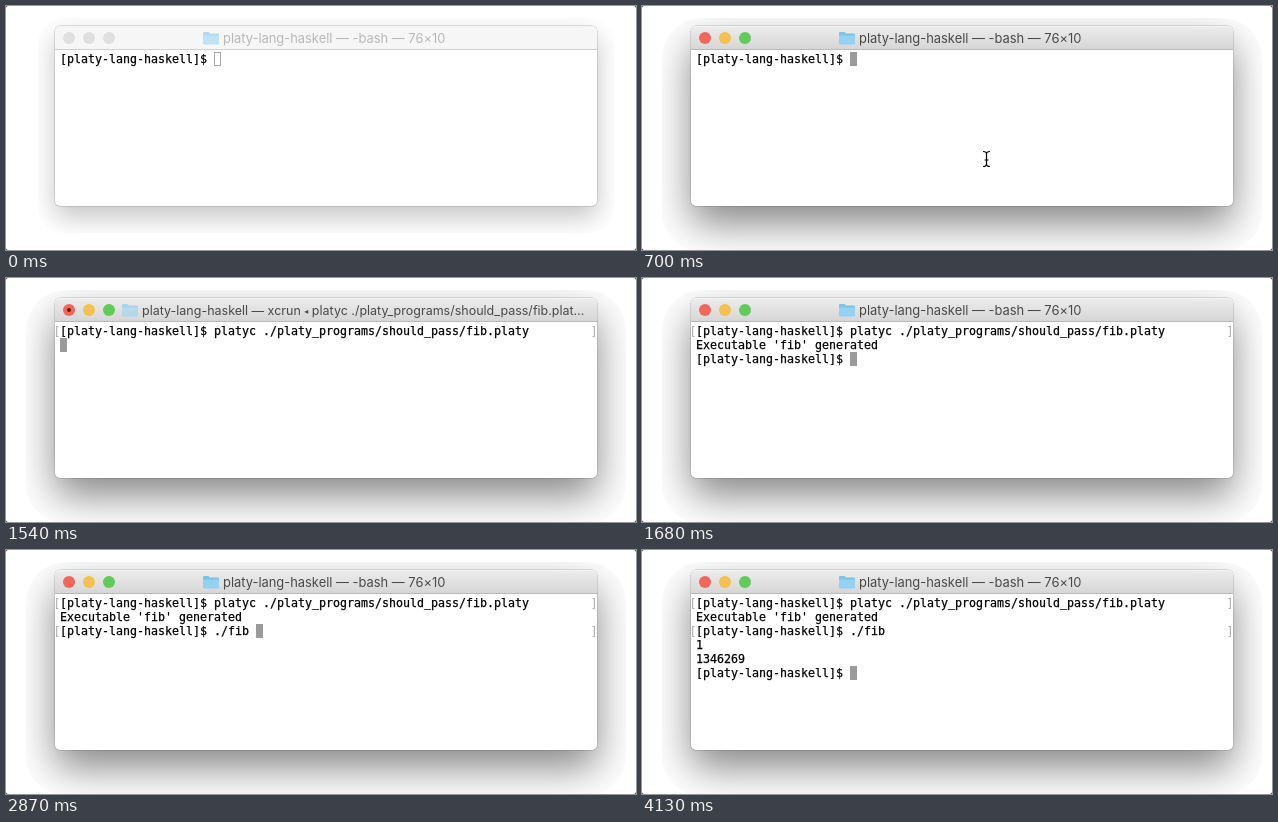
Write an HTML page that moves like this. It is 630 by 244 pixels and loops after 4.62 s.

```html
<!DOCTYPE html>
<html lang="en">
<head>
<meta charset="utf-8">
<title>Terminal session</title>
<style>
  html, body { margin: 0; width: 100%; height: 100%; overflow: hidden; background: #000; }
  #stage { position: relative; width: 630px; height: 244px; overflow: hidden; background: #fff; border-radius: 2px; }
  #stage * { position: absolute; box-sizing: border-box; }
  #win {
    left: 49px; top: 20px; width: 542px; height: 180px; border-radius: 5px; background: #fff;
    box-shadow: 0 0 0 .5px rgba(0,0,0,.22), 0 18px 40px rgba(0,0,0,.48);
    clip-path: inset(-8px -29px -46px -29px round 40px);
  }
  #bar {
    left: 0; top: 0; width: 542px; height: 24px; border-radius: 5px 5px 0 0;
    background: linear-gradient(#edeced, #d7d6d7); border-bottom: 1px solid #b9b8b9;
    border-top: 1px solid #f4f3f4;
  }
  .light { top: 26px; width: 12px; height: 12px; border-radius: 50%; }
  #dot { left: 61px; top: 30px; width: 4px; height: 4px; border-radius: 50%; background: #7a100c; }
  #title {
    top: 22.5px; white-space: pre; color: #4a4a4a;
    font: 12.9px/20px Inter, "DejaVu Sans", sans-serif; font-feature-settings: "calt" 0;
  }
  #title small { position: static; font-size: 8px; line-height: 1; vertical-align: 1px; }
  #folder { top: 25px; }
  #text, .mark { font: 11.63px/14px "DejaVu Sans Mono", monospace; white-space: pre; margin: 0; color: #000; }
  #text { left: 54px; top: 46px; -webkit-text-stroke: .25px #000; }
  .mark { color: #a9a9a9; }
  #caret { width: 7px; height: 14px; background: #9a9a9a; }
  #mouse { left: 0; top: 0; }

  .idle #win {
    box-shadow: 0 0 0 .5px rgba(0,0,0,.22), 0 11px 27px rgba(0,0,0,.24);
    clip-path: inset(-8px -17px -27px -17px round 26px);
  }
  .idle #bar { background: #f6f6f6; border-bottom-color: #d0d0d0; }
  .idle .light { background: #dfdfdf !important; }
  .idle #title { color: #b8b8b8; }
  .idle #folder, .busy #folder { opacity: .55; }
  .idle #caret { background: none; border: 1px solid #a8a8a8; }
</style>
</head>
<body>
<div id="stage">
  <div id="win"><div id="bar"></div></div>
  <div class="light" style="left:57px;background:#f2665c"></div>
  <div class="light" style="left:77px;background:#f6c050"></div>
  <div class="light" style="left:97px;background:#60cb5a"></div>
  <div id="dot"></div>
  <svg id="folder" width="16" height="14">
    <path d="M0 2.2Q0 1 1.2 1H5.4L7 2.6H14.8Q16 2.6 16 3.8V12.3Q16 13.3 15 13.3H1Q0 13.3 0 12.3Z" fill="#7cc3e8"/>
    <path d="M0 4.6H16V12.3Q16 13.3 15 13.3H1Q0 13.3 0 12.3Z" fill="#93d2f4"/>
  </svg>
  <div id="title"></div>
  <div id="caret"></div>
  <pre id="text"></pre>
  <div id="marks"></div>
  <svg id="mouse" width="630" height="244" fill="none">
    <g id="beam">
      <path id="beamHalo" stroke="#fff" stroke-width="3"/>
      <path id="beamLine" stroke="#000" stroke-width="1.2"/>
    </g>
    <path id="arrow" d="M0 0V14.2L3.3 11.1L5.5 16.2L7.9 15.2L5.7 10.2H10.2Z" fill="#000" stroke="#fff"/>
    <circle id="ring" cx="344" cy="153" r="16.3" stroke="#000" stroke-width="1.6"/>
  </svg>
</div>
<script>
const LOOP = 4620, CELL = 7, ROW = 14, LEFT = 54, TOP = 46;
const $ = id => document.getElementById(id);

const prompt = "[platy-lang-haskell]$ ";
const command = prompt + "platyc ./platy_programs/should_pass/fib.platy";
const built = command + "\nExecutable 'fib' generated\n" + prompt;
const ran = built + "./fib ";

const titles = {
  bash: { html: "platy-lang-haskell — -bash — 76×10", x: 217, size: 12.9 },
  xcrun: {
    html: "platy-lang-haskell — xcrun <small>◂</small> platyc ./platy_programs/should_pass/fib.plat…",
    x: 136, size: 12.5
  }
};

const start = { idle: true, title: "bash", dot: false, text: prompt, marks: [], mouse: null, ring: false };

// Each step changes only the listed properties.
const steps = [
  [280, { mouse: ["arrow", 325.5, 216] }],
  [350, { mouse: ["beam", 339, 186] }],
  [420, { mouse: ["beam", 349, 162] }],
  [560, { mouse: ["beam", 344.5, 153] }],
  [630, { ring: true }],
  [700, { ring: false, idle: false }],
  [1050, { text: command }],
  [1400, { text: command + "\n", marks: [0], mouse: null }],
  [1540, { title: "xcrun", dot: true }],
  [1610, { text: built }],
  [1680, { title: "bash", dot: false }],
  [2310, { text: built + "." }],
  [2380, { text: built + "./" }],
  [2590, { text: built + "./f" }],
  [2730, { text: built + "./fi" }],
  [2870, { text: ran, marks: [0, 2] }],
  [3150, { text: ran + "\n", dot: true }],
  [3220, { text: ran + "\n1\n1346269\n" + prompt, dot: false }],
  [3850, { mouse: ["beam", 344, 155] }],
  [3920, { mouse: ["beam", 342, 167] }],
  [3990, { mouse: ["beam", 338, 188] }],
  [4060, { mouse: ["arrow", 329.5, 221] }],
  [4130, { mouse: null }]
];

const beamPath = "M-3.5 -7.5Q0 -7.5 0 -5V5Q0 7.5 -3.5 7.5M3.5 -7.5Q0 -7.5 0 -5M0 5Q0 7.5 3.5 7.5M-2 1H2";
for (const id of ["beamHalo", "beamLine"]) $(id).setAttribute("d", beamPath);

const show = (el, on) => { el.style.display = on ? "" : "none"; };
const place = (el, x, y) => { el.style.left = x + "px"; el.style.top = y + "px"; };

function addMark(row, char, x) {
  const el = document.createElement("div");
  el.className = "mark";
  el.textContent = char;
  place(el, x, TOP + row * ROW);
  $("marks").append(el);
}

function draw(state) {
  $("stage").className = state.idle ? "idle" : state.title === "xcrun" ? "busy" : "";

  const title = titles[state.title];
  $("title").innerHTML = title.html;
  $("title").style.left = title.x + "px";
  $("title").style.fontSize = title.size + "px";
  $("folder").style.left = title.x - 20 + "px";
  show($("dot"), state.dot);

  $("text").textContent = state.text;
  const lines = state.text.split("\n");
  const last = lines.length - 1;
  place($("caret"), LEFT + lines[last].length * CELL, TOP + last * ROW);

  $("marks").replaceChildren();
  for (const row of state.marks) {
    addMark(row, "[", 47.5);
    addMark(row, "]", 584.5);
  }

  const [kind, x, y] = state.mouse || [];
  for (const id of ["beam", "arrow"]) {
    show($(id), id === kind);
    if (id === kind) $(id).setAttribute("transform", `translate(${x} ${y})`);
  }
  show($("ring"), state.ring);
}

let shown = -1;
function tick() {
  const t = performance.now() % LOOP;
  const past = steps.filter(([at]) => at <= t);
  if (past.length !== shown) {
    shown = past.length;
    draw(Object.assign({}, start, ...past.map(([, change]) => change)));
  }
  requestAnimationFrame(tick);
}
tick();
</script>
</body>
</html>
```
